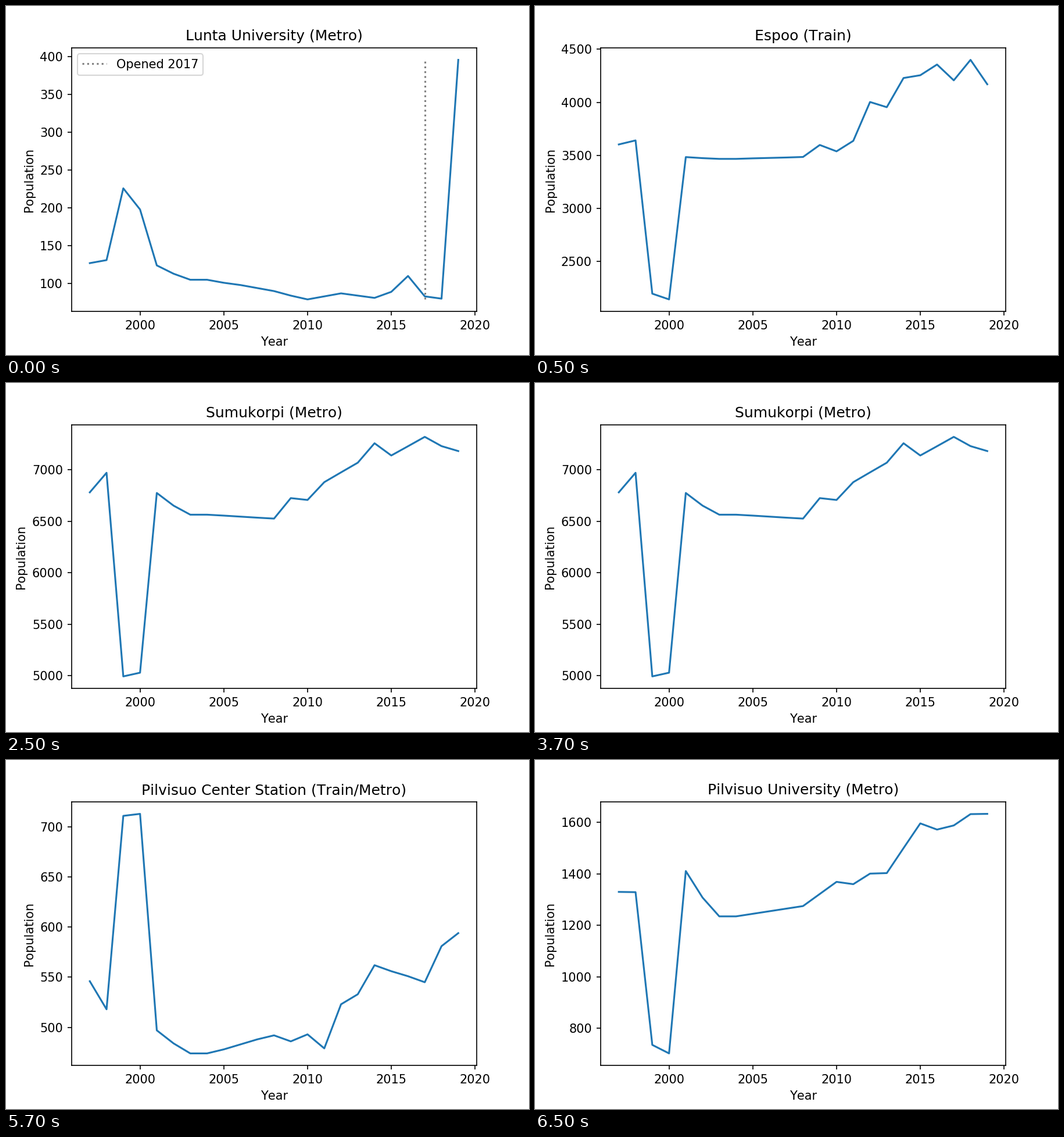
A matplotlib script for the animation above (8 s loop, 900 by 600 pixels).

```python
import matplotlib.pyplot as plt
import numpy as np
from matplotlib.animation import FuncAnimation

STEP_MS = 500
FRAMES = 16
YEARS = np.arange(1997, 2020)

# Title, opening year, the unsettled first five years, later turning points.
STATIONS = [
    ("Lunta University (Metro)", 2017, (127, 131, 226, 198, 124),
     {2003: 105, 2008: 90, 2010: 79, 2012: 87, 2014: 81, 2015: 89,
      2016: 110, 2017: 83, 2018: 80, 2019: 396}),
    ("Espoo (Train)", None, (3603, 3641, 2197, 2143, 3484),
     {2003: 3467, 2008: 3485, 2009: 3598, 2010: 3538, 2011: 3637, 2012: 4003,
      2013: 3954, 2014: 4229, 2015: 4255, 2016: 4356, 2017: 4207, 2018: 4400,
      2019: 4170}),
    ("Sumukorpi (Metro)", None, (6780, 6970, 4992, 5028, 6774),
     {2003: 6563, 2008: 6525, 2009: 6724, 2010: 6706, 2011: 6879, 2013: 7068,
      2014: 7257, 2015: 7138, 2017: 7319, 2018: 7229, 2019: 7181}),
    ("Pilvisuo Center Station (Train/Metro)", None, (546, 518, 711, 713, 497),
     {2003: 474, 2008: 492, 2009: 486, 2010: 493, 2011: 479, 2012: 523,
      2013: 533, 2014: 562, 2017: 545, 2018: 581, 2019: 594}),
    ("Pilvisuo University (Metro)", None, (1330, 1329, 736, 703, 1411),
     {2003: 1235, 2008: 1275, 2010: 1369, 2011: 1360, 2012: 1401, 2013: 1403,
      2015: 1596, 2016: 1572, 2017: 1588, 2018: 1632, 2019: 1633}),
]

plt.rcParams["font.family"] = "DejaVu Sans"
plt.rcParams["text.kerning_factor"] = 6
fig, ax = plt.subplots(figsize=(6, 4), dpi=150)
fig.subplots_adjust(left=0.125, right=0.9, bottom=0.125, top=0.88)


def yearly_population(early, later):
    """Whole-number population per year, straight between turning points."""
    points = dict(zip(YEARS, early)) | later
    # The fall to 2003 slows down on the way, then levels off for a year.
    points[2002] = points[2001] + 0.585 * (points[2003] - points[2001])
    points[2004] = points[2003]
    years = sorted(points)
    return np.round(np.interp(YEARS, years, [points[y] for y in years]))


def draw_station(title, opened, early, later):
    population = yearly_population(early, later)
    ax.clear()
    ax.plot(YEARS, population)
    if opened:
        ax.vlines(opened, population.min(), population.max(), colors="gray",
                  linestyles="dotted", label=f"Opened {opened}")
        ax.legend(loc="upper left")
    ax.set_title(title)
    ax.set_xlabel("Year")
    ax.set_ylabel("Population")


def update(frame):
    # The first chart shows for one step, each later one for four.
    draw_station(*STATIONS[(frame + 3) // 4])


anim = FuncAnimation(fig, update, frames=FRAMES, interval=STEP_MS,
                     repeat=True, repeat_delay=0)
plt.show()
```
